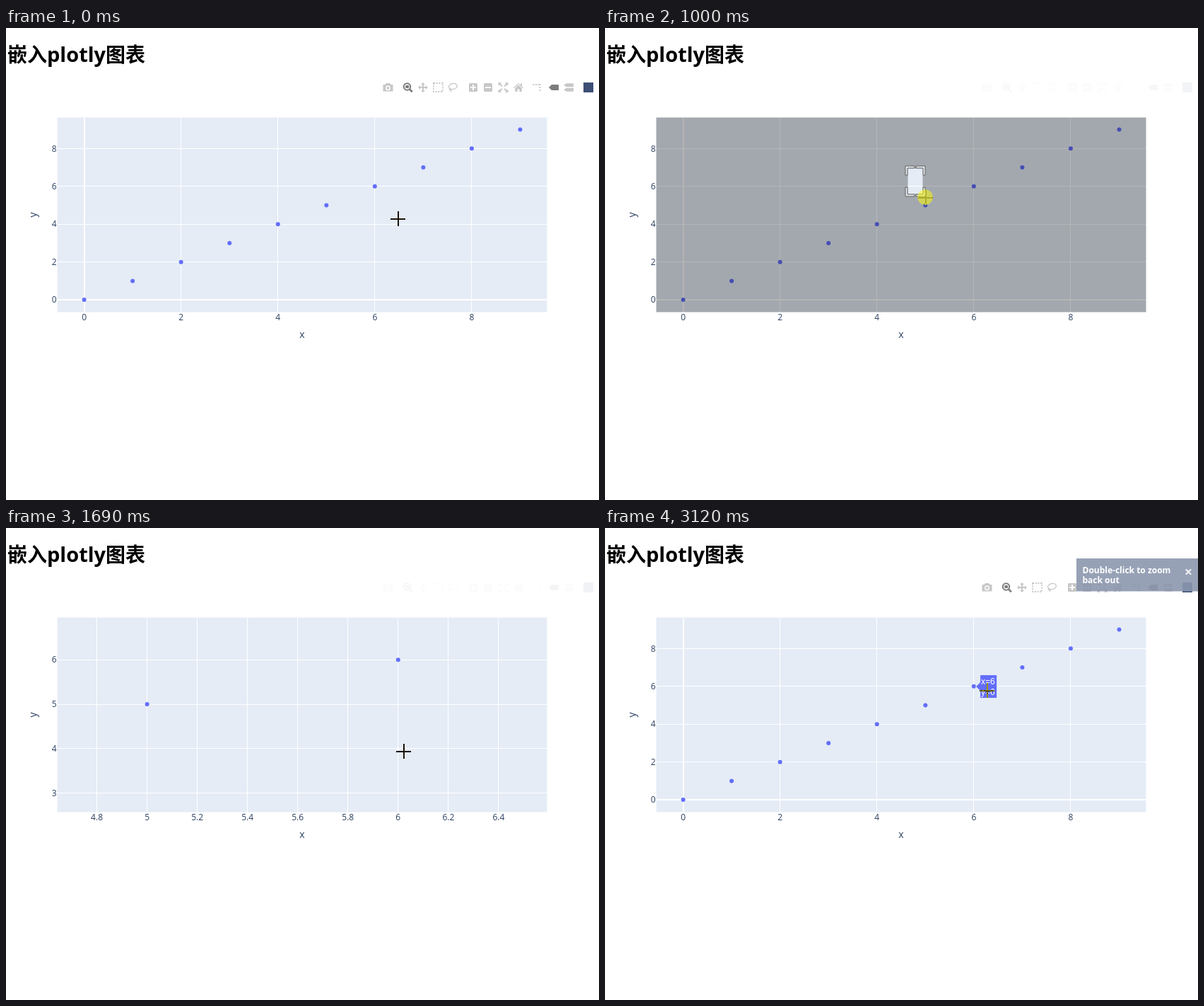
Write an HTML page that moves like this. It is 839 by 667 pixels and loops after 4190 ms.

```html
<!DOCTYPE html>
<html lang="zh">
<head>
<meta charset="utf-8">
<title>嵌入plotly图表</title>
<style>
  html, body { margin: 0; width: 100%; height: 100%; overflow: hidden; background: #fff; }
  svg { display: block; }
  text { font-family: "Open Sans", "Noto Sans", sans-serif; }
  .title { font-weight: 700; }
  .cjk { font: 700 28px "Noto Sans CJK SC", "Noto Sans CJK", sans-serif; }
  .axis { font-size: 12px; fill: #2a3f5f; }
  .grid { stroke: #fff; shape-rendering: crispEdges; }
  .tip text { font: 12px "Liberation Sans", Arial, sans-serif; fill: #fff; }
  .note text { font-weight: 700; font-size: 12px; fill: #fff; }
  #cross { mix-blend-mode: difference; }
</style>
</head>
<body>
<svg width="839" height="667" viewBox="0 0 839 667">
  <rect width="839" height="667" fill="#fff"/>
  <text class="title" y="48" font-size="29"><tspan class="cjk" x="2">嵌入</tspan><tspan x="58">plotly</tspan><tspan class="cjk" x="141">图表</tspan></text>
  <rect x="72.5" y="126.5" width="693" height="275" fill="#e5ecf6"/>
  <g id="full"></g>
  <g id="zoomed"></g>
  <g class="axis" text-anchor="middle" style="font-size:14px">
    <text x="419" y="438">x</text>
    <text transform="translate(43 264) rotate(-90)">y</text>
  </g>
  <g id="drag">
    <path id="shade" fill-rule="evenodd"/>
    <path id="corners" fill="#fff" stroke="#444"/>
  </g>
  <g id="bar"></g>
  <g id="tip" class="tip">
    <path d="M524.6 224l6 6v10.5h24v-33h-24v10.5z" fill="#636efa" stroke="#fff" stroke-width=".7"/>
    <text x="532" y="221">x=6</text>
    <text x="532" y="236">y=6</text>
  </g>
  <g id="note" class="note">
    <rect x="667" y="43" width="172" height="46.5" fill="#8c97af" fill-opacity=".9"/>
    <text x="675.5" y="64">Double-click to zoom</text>
    <text x="675.5" y="78">back out</text>
    <text x="825.5" y="68.5" text-anchor="middle" style="font-size:20px" opacity=".85">×</text>
  </g>
  <path id="cross" fill="#fff" d="M0-10h2v10h9v2h-9v9h-2v-9h-10v-2h10z"/>
  <circle id="press" r="10.8" fill="#ff0" fill-opacity=".5"/>
</svg>
<script>
const LOOP = 4190, STEP = 50;
const LEFT = 72.5, RIGHT = 765.5, TOP = 126.5, BOTTOM = 401.5;
const START = { x: 428.5, y: 198.5 };
const $ = id => document.getElementById(id);
const clamp = k => Math.max(0, Math.min(1, k));
const cubic = k => k < .5 ? 4 * k ** 3 : 1 - 4 * (1 - k) ** 3;

// One scatter view: grid lines, tick labels and the points in range.
function chart(xs, ys, xTicks, yTicks, first, last) {
  let s = '';
  for (const v of xTicks) {
    const x = xs(v);
    s += `<path class="grid" stroke-width="${v ? 1 : 2}" d="M${x} ${TOP}V${BOTTOM}"/>
      <text class="axis" text-anchor="middle" x="${x}" y="413">${v}</text>`;
  }
  for (const v of yTicks) {
    const y = ys(v);
    s += `<path class="grid" stroke-width="${v ? 1 : 2}" d="M${LEFT} ${y}H${RIGHT}"/>
      <text class="axis" text-anchor="end" x="71.7" y="${y + 4.2}">${v}</text>`;
  }
  for (let v = first; v <= last; v++)
    s += `<circle cx="${xs(v)}" cy="${ys(v)}" r="3" fill="#636efa"/>`;
  return s;
}

const even = [0, 2, 4, 6, 8];
$('full').innerHTML = chart(v => 110.6 + v * 68.54, v => 384.1 - v * 26.72, even, even, 0, 9);
$('zoomed').innerHTML = chart(v => 199.6 + (v - 5) * 355.2, v => 249 - (v - 5) * 62.75,
  Array.from({ length: 9 }, (_, i) => +(4.8 + i * .2).toFixed(1)), [3, 4, 5, 6], 5, 6);

// Toolbar icons, drawn around their centres.
const box = '<rect x="-6" y="-6" width="12" height="12" rx="1.5"/>';
const cut = d => `<path d="${d}" fill="none" stroke="#fff" stroke-width="2"/>`;
const line = (d, w, more = '') => `<path d="${d}" fill="none" stroke="currentColor" stroke-width="${w}" ${more}/>`;
const tag = (y, h) => `<path d="M-7 ${y}l4-${h}h9q1 0 1 1v${2 * h - 2}q0 1-1 1h-9z"/>`;
const four = d => [0, 90, 180, 270].map(a => `<path transform="rotate(${a})" d="${d}"/>`).join('');
const icons = [
  [540.5, '<path d="M-7-4h3l1.5-2h5l1.500 2h3v9.500h-14z"/><circle cy=".7" r="3.500" fill="#fff"/><circle cy=".7" r="2"/>'],
  [568.5, '<circle cx="-1" cy="-1" r="4.700" fill="none" stroke="currentColor" stroke-width="2"/>' +
    line('M2.500 2.500L6.300 6.300', 2.6) + '<rect x="-3.200" y="-3" width="4.600" height="4"/>', 1],
  [590, four('M0-7l3 3h-2v4h-2v-4h-2z')],
  [611.5, line('M-6.500-6h13v12h-13z', 1.8, 'stroke-dasharray="2 1.700"')],
  [632.5, '<ellipse cx=".3" cy="-1.500" rx="6" ry="4" transform="rotate(-12)" fill="none" stroke="currentColor" stroke-width="1.300"/>' +
    line('M-4.500 1.500q-1.500 2 .5 2.300q2 .2 1 2.200', 1.4)],
  [661, box + cut('M-4 0h8M0-4v8')],
  [682, box + cut('M-4 0h8')],
  [703.5, four('M-7-7h4.500l-1.500 1.500 3 3-1.500 1.500-3-3-1.500 1.500z')],
  [725, '<path d="M0-6l7 6-.8 1L0-4.500-6.200 1-7 0zM-4.800 1L0-3.200 4.800 1v5h-3.300v-3.500h-3v3.500h-3.300z"/><path d="M3-5.500h2v4l-2-2z"/>'],
  [751, line('M-5.500-4h9', 2, 'stroke-dasharray="2 1.500"') + line('M4.500-5v11', 2, 'stroke-dasharray="2 2"')],
  [775, tag(0, 4), 1],
  [796, tag(-3.2, 2.5) + tag(3.2, 2.5)]
];
$('bar').innerHTML = icons.map(([x, art, on]) => {
  const c = on ? '#7c7c7c' : '#c7c7c7';
  return `<g transform="translate(${x} 84)" fill="${c}" color="${c}">${art}</g>`;
}).join('') + '<rect x="817" y="77" width="14" height="14" fill="#3d4f77"/>';

// Pointer path: time, x, y.
const path = [
  [150, 554, 269], [200, 550, 267], [300, 520, 250], [400, 476, 225], [500, 442, 206], [600, 428, 198],
  [850, 428, 198], [900, 433, 208], [950, 442, 225], [1000, 453, 239], [1050, 472, 260], [1100, 490, 276],
  [1200, 521, 298], [1300, 543, 309], [1400, 557, 314], [1480, 562, 315],
  [1850, 562, 315], [1920, 555, 306], [1990, 535, 284], [2060, 518, 266], [2120, 514, 260],
  [2200, 518, 255], [2250, 526, 245], [2300, 535, 234], [2350, 540, 229]
];
function pointer(t) {
  const i = path.findIndex(p => p[0] > t);
  if (i === 0) return { x: path[0][1], y: path[0][2] };
  const a = path[i < 0 ? path.length - 1 : i - 1], b = path[i] || a;
  const k = i < 0 ? 0 : (t - a[0]) / (b[0] - a[0]);
  return { x: a[1] + (b[1] - a[1]) * k, y: a[2] + (b[2] - a[2]) * k };
}

function cornerPath(l, t, r, b) {
  const n = Math.floor(Math.min(b - t, r - l, 20) / 2), m = n + 3;
  const one = (x, y, sx, sy) =>
    `M${x - 3.5 * sx} ${y + (n - .5) * sy}h${3 * sx}v${-n * sy}h${n * sx}v${-3 * sy}h${-m * sx}v${m * sy}z`;
  return one(l, t, 1, 1) + one(r, t, -1, 1) + one(r, b, -1, -1) + one(l, b, 1, -1);
}

const show = (id, on) => $(id).setAttribute('display', on ? 'inline' : 'none');
const within = (t, a, b) => t >= a && t < b;

function draw(t) {
  const q = Math.floor(t / STEP) * STEP;   // the screen refreshes in steps
  const p = pointer(q), at = `translate(${Math.round(p.x)} ${Math.round(p.y)})`;
  $('cross').setAttribute('transform', at);
  $('press').setAttribute('transform', at);
  show('press', within(t, 770, 1640) || within(t, 2430, 2610) || within(t, 2700, 2800));

  const zoomed = within(t, 1640, 2800);
  show('zoomed', zoomed);
  show('full', !zoomed);
  show('tip', t >= 3000);

  const dragging = within(t, 880, 1640);
  show('drag', dragging);
  if (dragging) {
    const e = pointer(q - 18), k = cubic(clamp((q - 882) / 200));
    const r = Math.max(START.x, Math.round(e.x) + .5), b = Math.max(START.y, Math.round(e.y) + .5);
    $('shade').setAttribute('d',
      `M${LEFT} ${TOP}H${RIGHT}V${BOTTOM}H${LEFT}zM${START.x} ${START.y}V${b}H${r}V${START.y}z`);
    $('shade').setAttribute('fill-opacity', .4 * k);
    $('corners').setAttribute('d', cornerPath(START.x, START.y, r, b));
    $('corners').setAttribute('opacity', k);
  }

  const out = (1 - clamp((q - 770) / 300)) ** 2;
  const back = 1 - (1 - clamp((q - 1640) / 300)) ** 2;
  $('bar').setAttribute('opacity', t < 1640 ? out : back);
  $('note').setAttribute('opacity', cubic(clamp((q - 1850) / 455)));
}

function tick() {
  draw(performance.now() % LOOP);
  requestAnimationFrame(tick);
}
tick();
</script>
</body>
</html>
```
